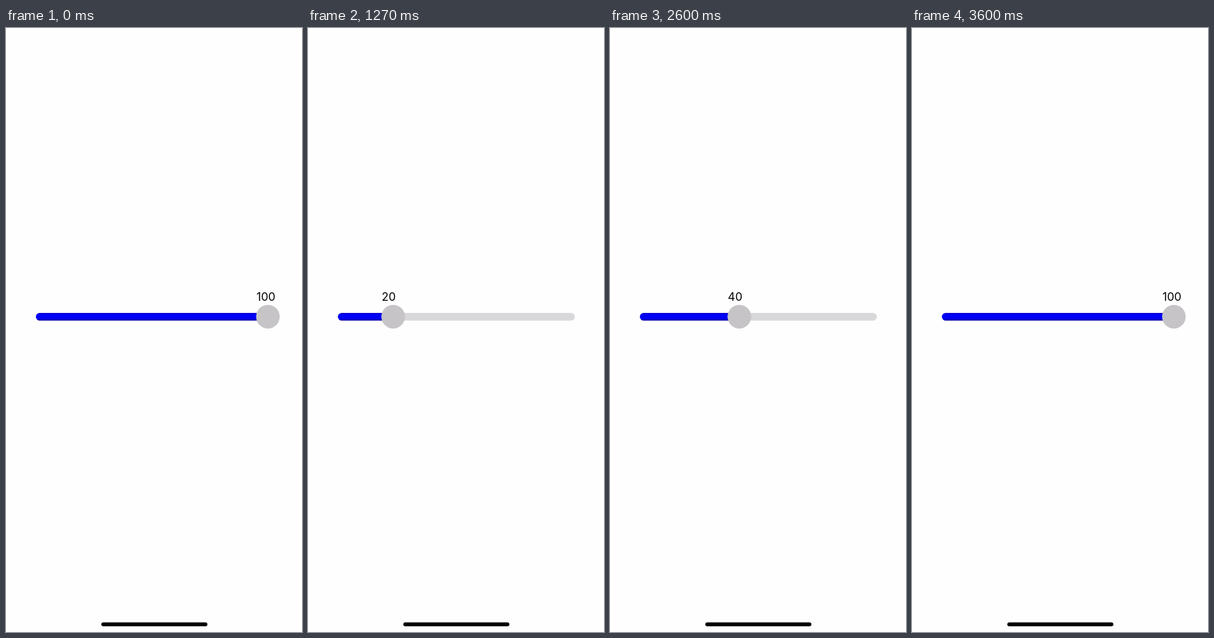
These frames come from a looping animation (416 by 848 pixels, 4540 ms). An HTML page with a canvas:

```html
<!DOCTYPE html>
<html lang="en">
<head>
<meta charset="utf-8">
<title>Slider</title>
<style>
  html, body { margin: 0; width: 100%; height: 100%; overflow: hidden; background: #fefefe; }
  canvas { display: block; width: 416px; height: 848px; }
</style>
</head>
<body>
<canvas id="stage"></canvas>
<script>
const W = 416, H = 848, LOOP = 4540;
const BAR = { x: 42, y: 400, w: 333, h: 10.7 };
const KNOB = { y: 405.3, r: 16.6, min: 57.6, range: 310.5 };

// Times at which the value moves by one step of ten.
const DOWN = [670, 800, 870, 1000, 1070, 1130, 1200, 1270, 1400, 1530];
const UP = [2130, 2270, 2470, 2600, 2730, 2870, 3000, 3130, 3270, 3400];

const canvas = document.getElementById('stage');
const ctx = canvas.getContext('2d');
const scale = window.devicePixelRatio || 1;
canvas.width = W * scale;
canvas.height = H * scale;
ctx.scale(scale, scale);

const shade = ctx.createLinearGradient(0, BAR.y, 0, BAR.y + BAR.h);
shade.addColorStop(0, '#1000c4');
shade.addColorStop(0.2, '#0000f4');
shade.addColorStop(0.7, '#0000f4');
shade.addColorStop(1, '#0c00a8');

function valueAt(t) {
  const passed = times => times.filter(s => s <= t).length;
  return 100 - 10 * passed(DOWN) + 10 * passed(UP);
}

function pill(x, y, w, h, color) {
  ctx.fillStyle = color;
  ctx.beginPath();
  ctx.roundRect(x, y, w, h, h / 2);
  ctx.fill();
}

function draw(t) {
  const value = valueAt(t);
  const x = KNOB.min + KNOB.range * value / 100;

  ctx.fillStyle = '#fefefe';
  ctx.fillRect(0, 0, W, H);

  pill(BAR.x, BAR.y, BAR.w, BAR.h, '#d8d7d9');
  if (value > 0) pill(BAR.x, BAR.y, x - BAR.x, BAR.h, shade);

  ctx.fillStyle = '#c6c4c7';
  ctx.beginPath();
  ctx.arc(x, KNOB.y, KNOB.r, 0, Math.PI * 2);
  ctx.fill();

  ctx.fillStyle = '#000';
  ctx.font = '16px Inter, sans-serif';
  ctx.fillText(value, x - KNOB.r + 0.4, 383);

  pill(134, 834.5, 149, 5.4, '#000');
}

function tick() {
  draw(performance.now() % LOOP);
  requestAnimationFrame(tick);
}
tick();
</script>
</body>
</html>
```
